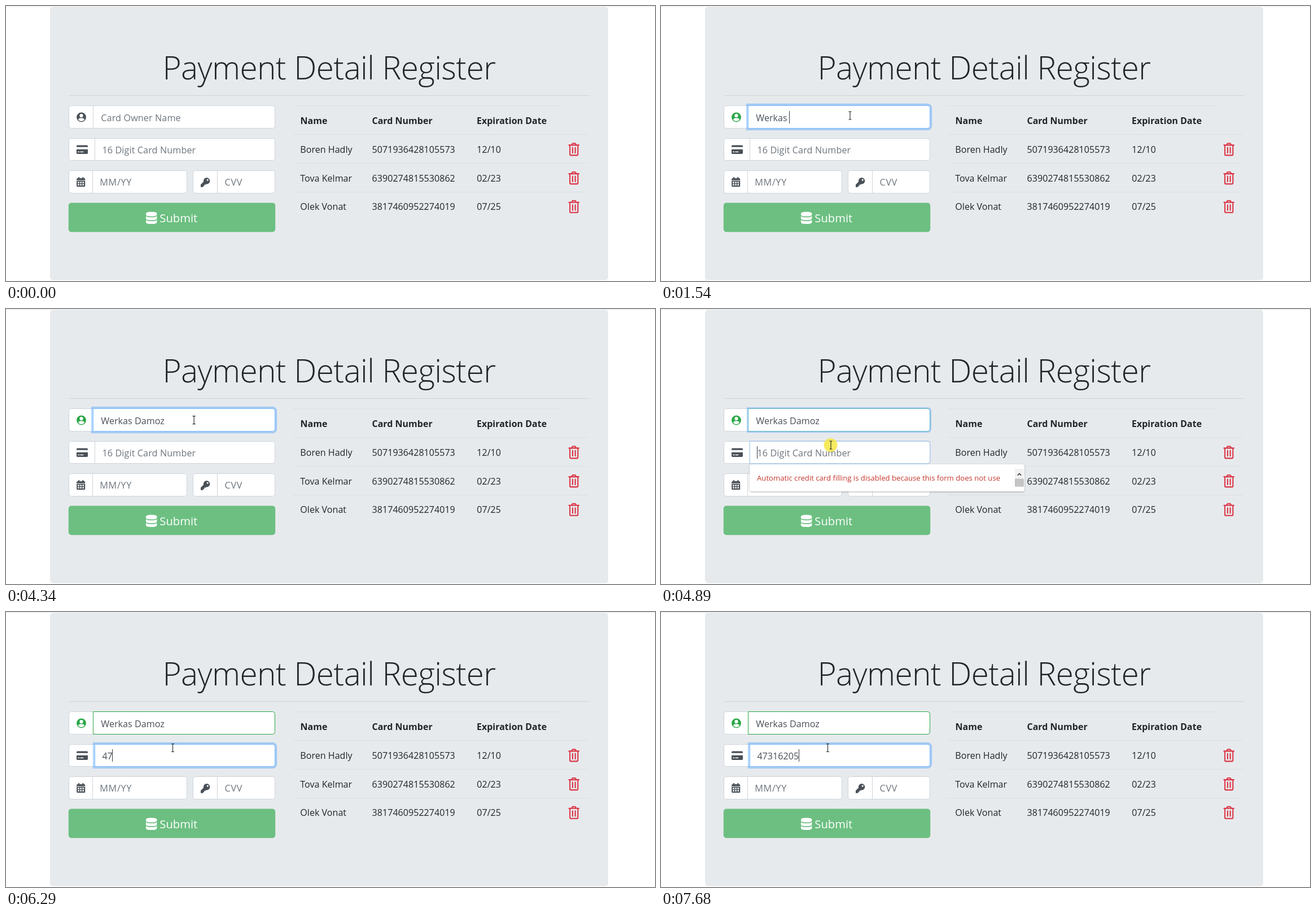
Write an HTML page that moves like this. It is 1150 by 487 pixels and loops after 8 s.

```html
<!DOCTYPE html>
<html lang="en">
<head>
<meta charset="utf-8">
<title>Payment Detail Register</title>
<style>
  html, body { margin: 0; width: 100%; height: 100%; overflow: hidden; background: #fff; }
  svg { display: block; width: 100%; height: 100%; }
  text { font: 16.1px "Open Sans", "Noto Sans", sans-serif; fill: #212529; }
  .title { font-size: 56.8px; font-weight: 300; letter-spacing: -.65px; text-anchor: middle; }
  .head { font-size: 16px; font-weight: 700; }
  .value { font-size: 16.15px; fill: #495057; }
  .hint { font-size: 16.2px; fill: #6c757d; letter-spacing: .1px; }
  .caps { letter-spacing: .7px; }
  .submit { font-size: 20.2px; font-weight: 500; fill: #fff; }
  .note { font-size: 13.15px; fill: #c5372c; }
  .icon { fill: #495057; }
  .hole { fill: #fff; }
  .box { fill: #fff; stroke: #ced4da; }
  .rule { stroke: #dcdfe3; }
  .glow { fill: #007bff; fill-opacity: .29; }
  .trash { fill: none; stroke: #dc3545; stroke-width: 2.1; stroke-linejoin: round; stroke-linecap: round; }
</style>
</head>
<body>
<svg id="stage" viewBox="0 0 1150 487" xmlns="http://www.w3.org/2000/svg"></svg>
<script>
const LOOP = 8000;
const OWNER = "Werkas Damoz", CARD = "47316205";
const RIGHT = 476.5;
const GREY = [206, 212, 218], BLUE = [128, 189, 255], GREEN = [40, 167, 69];

// Times at which each character is typed
const ownerKeys = [300, 620, 680, 1000, 1150, 1230, 1540, 2390, 2540, 2710, 3030, 3720];
const cardKeys = [6040, 6290, 6530, 6680, 7150, 7290, 7520, 7680];
// Spans of time
const ownerNote = [[80, 300]];
const cardNote = [[4890, 6040], [6130, 6290], [6370, 6680], [6770, 7290]];
const caretOff = [[0, 80], [2070, 2390], [3490, 3720], [4250, 4810], [5440, 6040]];
const clickRing = [[4810, 5040]];
// [time, focus strength]
const ownerFocus = [[0, 0], [80, .4], [130, 1], [4890, .65], [4980, .15], [5040, 0]];
const cardFocus = [[0, 0], [4890, .2], [4980, .8], [5040, 1]];

const rows = [
  ["Boren Hadly", "5071936428105573", "12/10"],
  ["Tova Kelmar", "6390274815530862", "02/23"],
  ["Olek Vonat", "3817460952274019", "07/25"]
];

const text = (x, y, str, cls = "") => `<text x="${x}" y="${y}" class="${cls}">${str}</text>`;
const rect = (x, y, w, h, attrs = "") => `<rect x="${x}" y="${y}" width="${w}" height="${h}" ${attrs}/>`;
const line = (x1, x2, y, cls = "rule") => `<path class="${cls}" d="M${x1} ${y}H${x2}"/>`;

// Input outline: square on the left, rounded on the right, grown by g
function inputPath(x, y, h, g = 0) {
  const r = 4 + g;
  return `M${x - g} ${y - g}H${RIGHT + g - r}a${r} ${r} 0 0 1 ${r} ${r}V${y + h + g - r}` +
    `a${r} ${r} 0 0 1 ${-r} ${r}H${x - g}z`;
}

const group = (x, split, end, y, h) =>
  rect(x, y, end - x, h, 'rx="4" class="box"') + `<path class="box" d="M${split} ${y}v${h}"/>`;

const field = (id, x, y, h) =>
  `<path id="${id}Glow" class="glow"/><path id="${id}Box" class="box" d="${inputPath(x, y, h)}"/>`;

const trash = y => `<path class="trash" d="M997.5 ${y - 7.6}h17.6M1002 ${y - 7.8}l2-2.9h4.6l2 2.9` +
  `M999.2 ${y - 7}V${y + 8.6}q0 1.8 1.8 1.8h10.6q1.8 0 1.8-1.8V${y - 7}` +
  `M1004 ${y - 3.2}v9.4M1008.7 ${y - 3.2}v9.4"/>`;

const userIcon = `<g id="userIcon" class="icon"><circle cx="133.5" cy="197" r="8.4"/>
  <circle class="hole" cx="133.5" cy="194.2" r="3.1"/>
  <path class="hole" d="M128 201.4q.6-2.9 3.4-2.9h4.2q2.8 0 3.4 2.9a7.1 7.1 0 0 1-11 0z"/></g>`;

const cardIcon = `<g class="icon">${rect(125, 246.5, 20, 15.5, 'rx="1.8"')}</g><g class="hole">` +
  rect(125, 249.8, 20, 4) + rect(127.2, 257.6, 3.2, 1.5) + rect(131.6, 257.6, 5.6, 1.5) + "</g>";

function calendarIcon() {
  let s = '<g class="icon">' + rect(125.2, 305, 15, 15, 'rx="1.6"') +
    rect(128, 303, 2.2, 4, 'rx=".6"') + rect(135.2, 303, 2.2, 4, 'rx=".6"') + '</g><g class="hole">' +
    rect(125.2, 308.6, 15, 1);
  for (let i = 0; i < 6; i++) s += rect(127.2 + i % 3 * 4.1, 311.4 + (i > 2) * 3.9, 2.6, 2.5);
  return s + "</g>";
}

const keyIcon = `<path class="icon" d="M351 310.3l-6 6v4.5h4.4v-2.1h2v-2.1h2l3-3z"/>
  <circle class="icon" cx="355.6" cy="309.7" r="5.7"/><circle class="hole" cx="357.2" cy="308.1" r="1.6"/>`;

const band = y => `<path d="M248 ${y}q0 3.1 9.7 3.1t9.7-3.1v5q0 3.1-9.7 3.1t-9.7-3.1z"/>`;
const dataIcon = `<g fill="#fff"><path d="M248 367.6q0-3.1 9.7-3.1t9.7 3.1v1.9q0 3.1-9.7 3.1t-9.7-3.1z"/>
  ${band(371.2)}${band(377.9)}</g>`;

const note = `<g id="note">
  ${rect(157, 275, 487, 48, 'rx="4" fill="#fff" filter="url(#shade)"')}
  ${text(170, 303.8, "Automatic credit card filling is disabled because this form does not use", "note")}
  ${rect(627, 283, 16, 32, 'fill="#f1f1f1"')}${rect(627, 300.5, 16, 14, 'fill="#c4c4c4"')}
  <path d="M631.8 294.6l3.2-3.2 3.2 3.2" fill="none" stroke="#444" stroke-width="1.8"/></g>`;

const $ = id => document.getElementById(id);

$("stage").innerHTML = `
  <defs><filter id="shade" x="-5%" y="-30%" width="110%" height="160%">
    <feDropShadow dx="0" dy="1" stdDeviation="1.6" flood-opacity=".3"/></filter></defs>
  ${rect(0, 0, 1150, 487, 'fill="#fff"')}
  ${rect(0, 0.5, 1150, 1, 'fill="#e4e5e6"')}
  ${rect(78, 1.5, 989, 484, 'rx="5.5" fill="#e7eaed"')}
  ${text(572.6, 130, "Payment Detail Register", "title")}
  <path d="M112 158.5H1033.5" stroke="#d0d3d6"/>
  ${line(508, 985, 177)}${[227.5, 278.5, 329.5].map(y => line(508, 1032, y)).join("")}
  ${text(521.6, 208.5, "Name", "head")}${text(648.5, 208.5, "Card Number", "head")}
  ${text(834, 208.5, "Expiration Date", "head")}
  ${rows.map((r, i) => {
    const y = 260 + i * 50.7;
    return text(521.3, y, r[0]) + text(648.6, y, r[1]) + text(834.3, y, r[2]) + trash(y - 6);
  }).join("")}
  ${group(111.5, 154.5, RIGHT, 176.5, 40)}
  ${group(111.5, 157.5, RIGHT, 234.5, 39)}
  ${group(111.5, 153.5, 320.5, 291.5, 40)}
  ${group(331.5, 374.5, RIGHT, 291.5, 40)}
  ${userIcon}${cardIcon}${calendarIcon()}${keyIcon}
  ${field("owner", 154.5, 176.5, 40)}${field("card", 157.5, 234.5, 39)}
  <text id="ownerText" x="168.3" y="203.8"></text>
  <text id="cardText" x="170.4" y="260.8"></text>
  ${text(166.3, 318, "MM/YY", "hint caps")}${text(387.6, 318, "CVV", "hint caps")}
  ${rect(110.8, 348.6, 366.4, 51.6, 'rx="5" fill="#6cbf81"')}
  ${dataIcon}${text(272.3, 383, "Submit", "submit")}
  ${rect(0, 0, 1, 22, 'id="caret" fill="#343a40"')}
  ${note}
  <g id="pointer"><circle id="ring" cx="-.5" cy="0" r="12" fill="#f5e642" fill-opacity=".85"/>
    <path d="M-2.5-7h2l.5.5.5-.5h2M0-6.5v13M-2.5 7h2l.5-.5.5.5h2" fill="none" stroke="#222" stroke-width="1.1"/></g>`;

const within = (spans, t) => spans.some(([a, b]) => t >= a && t < b);
const typed = (keys, t) => keys.filter(k => k <= t).length;
const stepAt = (steps, t) => steps.filter(s => s[0] <= t).pop()[1];
const mix = (a, b, p) => `rgb(${a.map((v, i) => Math.round(v + (b[i] - v) * p))})`;
const show = (id, on) => $(id).setAttribute("visibility", on ? "visible" : "hidden");

function fill(id, value, hint, n) {
  const el = $(id);
  const str = (n ? value.slice(0, n) : hint).replace(/ /g, "\u00a0");
  if (el.textContent !== str) {
    el.textContent = str;
    el.setAttribute("class", n ? "value" : "hint");
  }
  return +el.getAttribute("x") + (n ? el.getComputedTextLength() : 0);
}

function focus(id, x, y, h, p, rest) {
  $(id + "Glow").setAttribute("d", p ? inputPath(x, y, h, .5 + 3.2 * p) : "");
  $(id + "Box").style.stroke = mix(rest, BLUE, p);
}

function pointerAt(t) {
  if (t >= 5130) return [295.5, 240.5];
  const k = Math.min(1, Math.max(0, Math.floor((t - 4250) / 80) / 7));
  const e = k * k * (3 - 2 * k);
  return [335 - 34 * e, 194 + 47 * e];
}

function draw(t) {
  const ownerEnd = fill("ownerText", OWNER, "Card Owner Name", typed(ownerKeys, t));
  const cardEnd = fill("cardText", CARD, "16 Digit Card Number", typed(cardKeys, t));
  const second = t >= 4890;

  focus("owner", 154.5, 176.5, 40, stepAt(ownerFocus, t), second ? GREEN : GREY);
  focus("card", 157.5, 234.5, 39, stepAt(cardFocus, t), GREY);
  $("userIcon").style.fill = t >= 360 ? "#28a745" : "";

  $("caret").setAttribute("x", Math.floor(second ? cardEnd : ownerEnd));
  $("caret").setAttribute("y", second ? 243 : 186);
  show("caret", !within(caretOff, t));

  const first = within(ownerNote, t);
  $("note").setAttribute("transform", first ? "translate(-2.5 -57.5)" : "");
  show("note", first || within(cardNote, t));

  $("pointer").setAttribute("transform", `translate(${pointerAt(t)})`);
  $("pointer").style.display = t < 80 ? "none" : "";
  $("ring").style.display = within(clickRing, t) ? "" : "none";
}

const start = performance.now();
function tick() {
  draw((performance.now() - start) % LOOP);
  requestAnimationFrame(tick);
}
tick();
</script>
</body>
</html>
```
